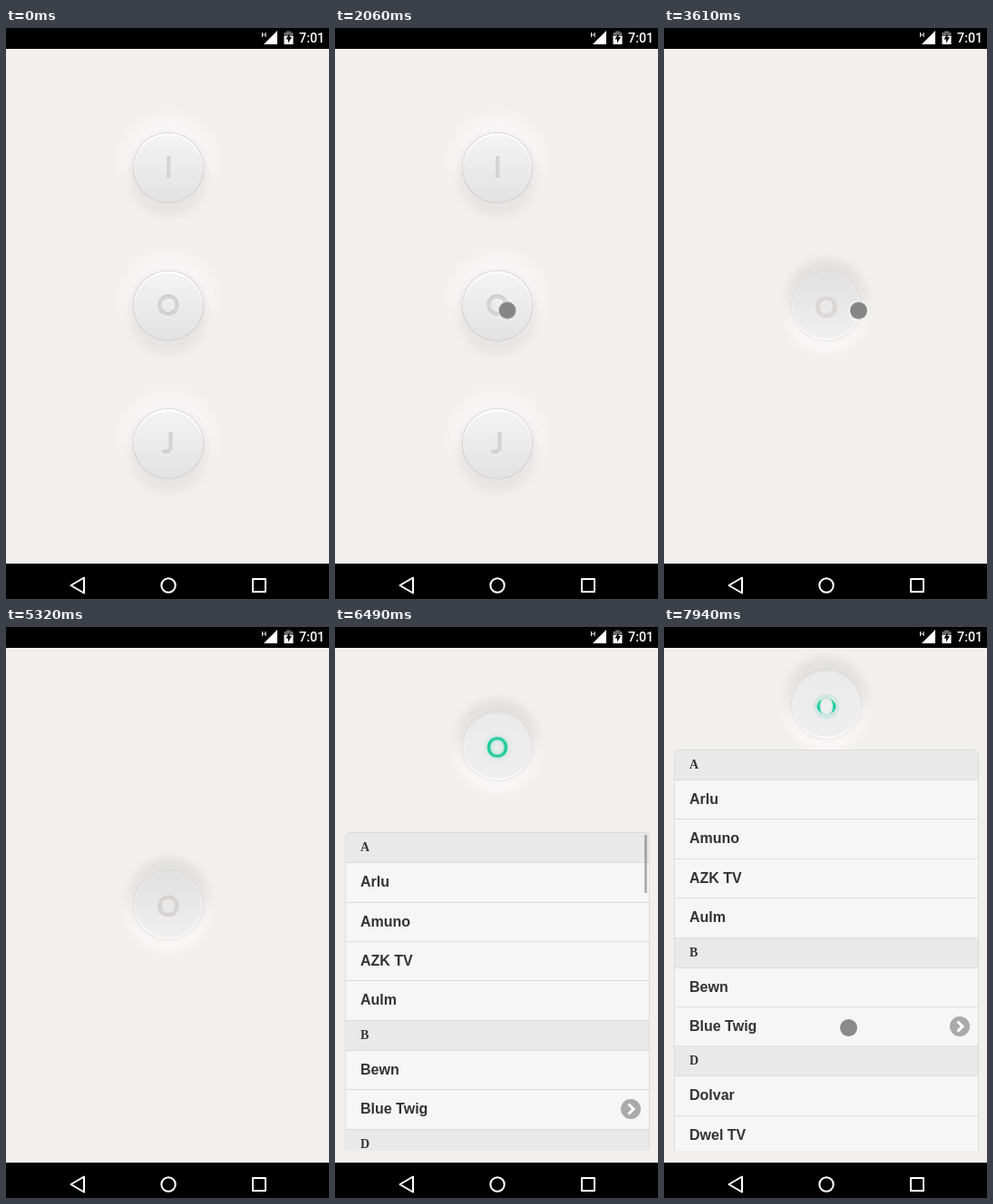
Animation of 356 by 629 pixels, one loop 8 s. Source, as an HTML page:

```html
<!DOCTYPE html>
<html lang="en">
<head>
<meta charset="utf-8">
<title>Remote picker</title>
<style>
html, body { margin: 0; width: 100%; height: 100%; overflow: hidden; background: #f2efee; }
body { position: relative; }
body *, body *::before { box-sizing: border-box; }
.bar { position: absolute; left: 0; width: 356px; background: #000; display: block; }
#status { top: 0; height: 23px; }
#nav { top: 590px; height: 39px; }

/* every animation shares one 8 s clock */
.anim { animation: 8s linear infinite; }

/* round buttons */
.btn { position: absolute; left: 141px; width: 76px; height: 76px; }
.face { position: absolute; inset: 0; border-radius: 50%; }
.up {
  background: linear-gradient(#f4f4f4, #e2e2e2);
  box-shadow: inset 0 2px 1px #fff, 0 0 1px 1px rgba(0,0,0,.12),
    0 8px 11px 6px rgba(0,0,0,.065), 0 -7px 12px 16px rgba(255,255,255,.4);
}
.down {
  background: #efeeee;
  box-shadow: inset 0 2px 2px rgba(0,0,0,.05), inset 0 -2px 1px rgba(255,255,255,.7),
    0 0 1px 1px rgba(0,0,0,.06), 0 -8px 11px 6px rgba(0,0,0,.065),
    0 8px 11px 7px rgba(255,255,255,.55);
  animation-name: press;
}
.down::before {
  content: ""; position: absolute; inset: 2px; border-radius: 50%;
  background: linear-gradient(#e1e0e0, #f1f0f0);
  animation: flatten 8s linear infinite;
}
.btn svg { position: absolute; left: 0; top: 0; overflow: visible; }
.btn text {
  font: 400 31px Lato, sans-serif; text-anchor: middle;
  fill: currentColor; stroke: currentColor; stroke-width: 1px; stroke-linejoin: round;
  color: #d4d3d3;
  filter: drop-shadow(0 1px 0 #f8f8f8) drop-shadow(0 -.6px 0 #c4c4c4);
}
.side { animation-name: leave; }
#main { top: 268px; animation-name: rise; }
#main .up { animation-name: leave; }
#main text { animation-name: letter; }
#ghost { animation-name: ghost; opacity: 0; }

@keyframes leave { 0%, 34.8% { opacity: 1 } 40.3%, 100% { opacity: 0 } }
@keyframes press { 0%, 34.8% { opacity: 0 } 40.3%, 100% { opacity: 1 } }
@keyframes flatten { 0%, 72.4% { opacity: 1 } 79%, 100% { opacity: .2 } }
@keyframes rise {
  0%, 72.41% { top: 268px; animation-timing-function: cubic-bezier(.37,0,.63,1) }
  84.91%, 100% { top: 47px }
}
@keyframes letter {
  0%, 34.8% {
    color: #d4d3d3; stroke-width: 1px; transform: none; opacity: 1;
    filter: drop-shadow(0 1px 0 #f8f8f8) drop-shadow(0 -.6px 0 #c4c4c4);
  }
  40.3%, 42.24% {
    color: #dedbdb; stroke-width: 1.8px; transform: translateY(1.5px);
    filter: drop-shadow(0 1px 0 #f4f4f4) drop-shadow(0 0 0 #dcdada);
  }
  42.25%, 53.74% { color: #dad7d7; stroke-width: 2.2px }
  53.75%, 60.62% { color: #d9d6d6 }
  60.625%, 66.49% { color: #d8d5d5 }
  66.5%, 73% {
    color: #d7d4d4; stroke-width: 2.2px; transform: translateY(1.5px);
    filter: drop-shadow(0 1px 0 #f4f4f4) drop-shadow(0 0 0 #dcdada);
  }
  78%, 84.8% {
    color: #1fcb9c; stroke-width: .3px; transform: translateY(1.5px); opacity: 1;
    filter: drop-shadow(0 0 1px rgba(31,203,156,.3)) drop-shadow(0 0 3px rgba(31,203,156,.3));
  }
  84.81%, 100% { color: #1fcb9c; opacity: 0; transform: translateY(1.5px) }
}
@keyframes ghost { 0%, 84.8% { opacity: 0 } 84.81%, 100% { opacity: 1 } }

/* list grows upward from its bottom edge */
#list {
  position: absolute; left: 11px; bottom: calc(100% - 577px); width: 336px; height: 0;
  overflow: hidden; border-radius: 5px 5px 0 0; animation-name: grow;
  font: bold 16px "Liberation Sans", Arial, sans-serif; color: #333;
  text-shadow: 0 1px 0 #f3f3f3;
}
#list > div {
  position: relative; height: 43.4px; line-height: 42.4px; padding-left: 16px;
  background: #f6f6f6; border: solid #ddd; border-width: 1px 1px 0;
}
#list > .head {
  height: 33px; background: #e9e9e9;
  font: bold 14px/32px "Liberation Serif", "Times New Roman", serif;
}
#list > .head:first-child { border-radius: 5px 5px 0 0; }
#list svg { position: absolute; left: 303px; top: 10px; }
#list > #thumb {
  position: absolute; top: 3px; right: 3px; width: 3px; height: 0; padding: 0;
  border: 0; background: rgba(0,0,0,.28); animation-name: thumb;
}
@keyframes grow {
  0%, 72.41% { height: 0; animation-timing-function: cubic-bezier(.37,0,.63,1) }
  84.91%, 100% { height: 442px }
}
@keyframes thumb {
  0%, 72.41% { height: 0; opacity: 1 }
  76.125% { height: 4px }
  78.625% { height: 25px }
  79.875% { height: 43px }
  81.125% { height: 64px }
  82.375% { height: 84px }
  83.625% { height: 98px }
  84.91%, 88.8% { height: 103px; opacity: 1 }
  89.75% { opacity: .65 }
  91.6%, 100% { height: 103px; opacity: 0 }
}

/* pointer */
#dot {
  position: absolute; left: -9.5px; top: -9.5px; width: 19px; height: 19px;
  animation-name: move;
}
#dot i {
  display: block; width: 19px; height: 19px; border-radius: 50%;
  background: #868686; animation-name: tap;
}
@keyframes move {
  0%, 6.5% { transform: translate(279px, 641px) }
  17.125% { transform: translate(242px, 445px); animation-timing-function: cubic-bezier(.3,.4,.6,1) }
  23.875%, 43.2% { transform: translate(189.5px, 310.5px) }
  45.125% { transform: translate(213.5px, 310.5px) }
  47.125%, 90.6% { transform: translate(293px, 348px) }
  93.5% { transform: translate(285px, 430px) }
  95.5% { transform: translate(262px, 484px) }
  99.25%, 100% { transform: translate(203px, 441px) }
}
@keyframes tap {
  0%, 25.74% { opacity: .95; transform: none; box-shadow: 0 0 0 1.5px rgba(255,255,255,.55) }
  25.75%, 33.62% { opacity: 1; transform: none }
  33.625%, 35.49% { opacity: 1; transform: scale(1.2) }
  35.5%, 47.2% { opacity: 1; transform: none; box-shadow: 0 0 0 1.5px rgba(255,255,255,.55) }
  48%, 90.5% { opacity: 0; transform: none; box-shadow: 0 0 0 0 rgba(255,255,255,0) }
  91.5%, 100% { opacity: .96; transform: none; box-shadow: 0 0 0 0 rgba(255,255,255,0) }
}
</style>
</head>
<body>
<div class="btn side anim" style="top:116px">
  <div class="face up"></div>
  <svg width="76" height="76"><text x="38" y="49">I</text></svg>
</div>
<div class="btn side anim" style="top:420px">
  <div class="face up"></div>
  <svg width="76" height="76"><text x="38" y="49">J</text></svg>
</div>
<div class="btn anim" id="main">
  <div class="face up anim"></div>
  <div class="face down anim"></div>
  <svg width="76" height="76">
    <text class="anim" x="38" y="49">O</text>
    <g id="ghost" class="anim">
      <circle cx="38" cy="40.5" r="14" fill="#1fcb9c" fill-opacity=".13"/>
      <ellipse cx="38" cy="40.5" rx="9" ry="9.5" fill="none" stroke="#c6e2d9" stroke-width="1.5"/>
      <ellipse cx="38" cy="40.5" rx="6" ry="8" fill="#ecefee"/>
      <path d="M33 32.5Q22 40.500 33 48.500Q28.500 40.500 33 32.500M43 32.500Q54 40.500 43 48.500Q47.500 40.500 43 32.500" fill="#1fcfa6"/>
    </g>
  </svg>
</div>

<div id="list" class="anim">
  <div class="head">A</div>
  <div>Arlu</div>
  <div>Amuno</div>
  <div>AZK TV</div>
  <div>Aulm</div>
  <div class="head">B</div>
  <div>Bewn</div>
  <div>Blue Twig
    <svg width="22" height="22"><circle cx="11" cy="11" r="11" fill="#aaa"/><path d="M8.500 5.500L14 11L8.500 16.500" fill="none" stroke="#fff" stroke-width="3"/></svg>
  </div>
  <div class="head">D</div>
  <div>Dolvar</div>
  <div>Dwel TV</div>
  <div id="thumb" class="anim"></div>
</div>

<svg class="bar" id="status" width="356" height="23" fill="#fff" font-family="Roboto, sans-serif">
  <text x="281.500" y="10" font-size="8" font-weight="500">H</text>
  <path d="M299 3V18H284Z"/>
  <path d="M309 3.500H314V5H316.500V11H306.500V5H309Z" fill="#6a6a6a"/>
  <path d="M306.500 9H316.500V18H306.500Z"/>
  <path d="M312.500 6L308.500 12.500H311V16.500L315 10H312.500Z" fill="#000"/>
  <text x="323" y="16" font-size="14.300" font-weight="500">7:01</text>
</svg>
<svg class="bar" id="nav" width="356" height="39" fill="none" stroke="#fff" stroke-width="2" stroke-linejoin="round">
  <path d="M71.500 24L86 15.500V32.500Z"/>
  <circle cx="179" cy="24" r="7.700"/>
  <rect x="272" y="17" width="14" height="14"/>
</svg>
<div id="dot" class="anim"><i class="anim"></i></div>
</body>
</html>
```
